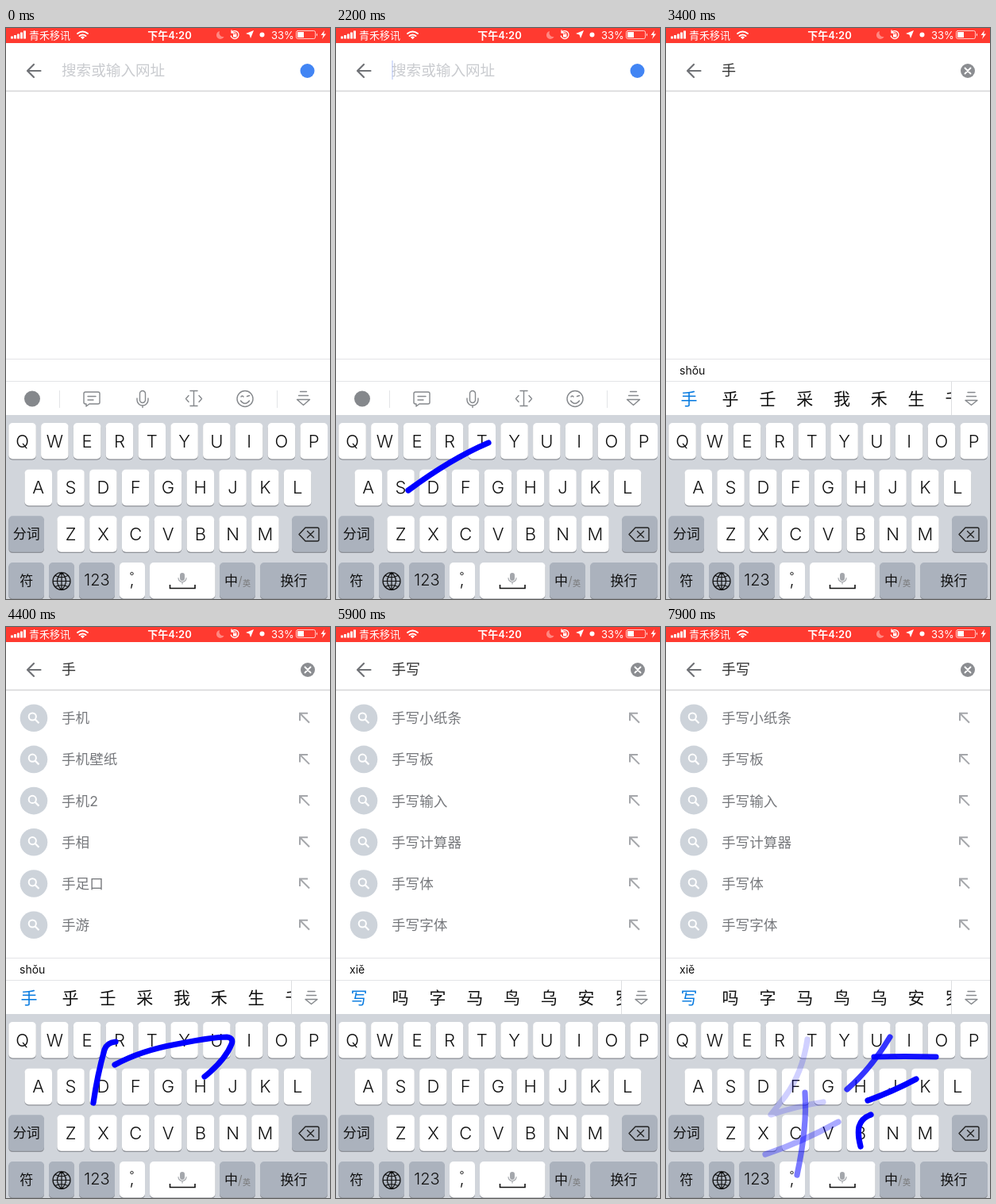
Animation of 408 by 720 pixels, one loop 8000 ms. Source, as an HTML page:

```html
<!DOCTYPE html>
<html lang="zh-CN">
<head>
<meta charset="utf-8">
<title>手写键盘</title>
<style>
  html, body { margin: 0; width: 100%; height: 100%; overflow: hidden; background: #fff; }
  svg { display: block; width: 408px; height: 720px; }
  text { font-family: Inter, "Noto Sans CJK SC", "Noto Sans CJK", sans-serif; }
  .mid { text-anchor: middle; }
  .line { fill: none; stroke-linecap: round; stroke-linejoin: round; }
  #status { fill: #fff; font-size: 13px; }
  #status .line { stroke: #fff; }
  #tools .line, .fold { stroke: #85888c; stroke-width: 1.4; }
  #keys text { font-weight: 300; font-size: 22px; fill: #111; }
  #keys .small { font-size: 17px; font-weight: 350; }
  #ink path { stroke: #00f; stroke-width: 7.2; }
</style>
</head>
<body>
<svg viewBox="0 0 408 720">
  <rect width="408" height="720" fill="#fff"/>

  <g id="status">
    <rect width="408" height="19" fill="#ff3a30"/>
    <path d="M6 10.5h3v3h-3zM10 9h3v4.500h-3zM14 7.500h3v6h-3zM18 5.500h3v8h-3zM22 3.500h3v10h-3z"/>
    <text x="29" y="13.500">青禾移讯</text>
    <path class="line" stroke-width="2" d="M90 7q6.500-5 13 0M92.500 10q4-3 8 0"/>
    <path d="M93.800 11.500q2.700-2 5.400 0l-2.700 2.800z"/>
    <text class="mid" x="206" y="13.500" font-weight="600">下午4:20</text>
    <path opacity=".4" d="M269 4a5 5 0 1 0 5.500 7a5 5 0 0 1-5.500-7z"/>
    <path class="line" stroke-width="1.300" d="M284 5.500a5 5 0 1 1-.8 4.500M284 3v3h3"/>
    <path d="M286 8h4.500v3.500h-4.500z"/>
    <path class="line" stroke-width="1" d="M287 8v-1a1.300 1.300 0 0 1 2.600 0v1"/>
    <path d="M312 3l-4 10-1.500-4.500-4.500-1.500z"/>
    <circle cx="322.500" cy="8.500" r="3"/>
    <text x="334" y="13.500">33%</text>
    <rect class="line" x="365.500" y="3.500" width="24" height="10" rx="2" stroke-width="1" opacity=".75"/>
    <path d="M367 5h8v7h-8zM391 6.500q2 2 0 4z"/>
    <path d="M401 3l-4.500 6h3l-1.500 5 5-6.500h-3z"/>
  </g>

  <path class="line" stroke="#707276" stroke-width="2.200" d="M43.500 54H27.500M35 46l-8 8 8 8"/>
  <path d="M0 79.500H408" stroke="#d5d5d7" stroke-width="1.500"/>
  <text id="hint" x="70" y="59.500" font-size="18.600" fill="#c9cbcf">搜索或输入网址</text>
  <circle id="voice" cx="379.500" cy="54" r="9" fill="#4285f4"/>
  <text id="query" x="70" y="59.500" font-size="18" fill="#333"></text>
  <g id="clear">
    <circle cx="380" cy="54" r="9" fill="#8b8d91"/>
    <path class="line" stroke="#fff" stroke-width="1.900" d="M376.500 50.500l7 7m0-7l-7 7"/>
  </g>
  <rect id="caret" y="41" width="2" height="24" fill="#3a62e0"/>

  <g id="list"></g>

  <path d="M0 417.500H408M0 445.500H408" stroke="#e3e4e7"/>
  <g id="tools">
    <circle cx="33" cy="467.500" r="10" fill="#85888c"/>
    <path d="M67.500 457v22M341.500 457v22" stroke="#e3e4e7"/>
    <path class="line" d="M100 459h16a2 2 0 0 1 2 2v11a2 2 0 0 1-2 2h-11l-4 3v-3h-1a2 2 0 0 1-2-2v-11a2 2 0 0 1 2-2zM103 464.500h10M103 469h7"/>
    <path class="line" d="M168.500 461a3.500 3.500 0 0 1 7 0v8a3.500 3.500 0 0 1-7 0zM165 467v2a7 7 0 0 0 14 0v-2M172 476v2.500"/>
    <path class="line" d="M232 457.500h9M236.500 457.500v19M232 476.500h9M230 463.500l-3.500 4 3.500 4M243 463.500l3.500 4-3.500 4"/>
    <path class="line" d="M291 467.500a10 10 0 1 1 20 0a10 10 0 1 1-20 0M295.500 470q5.500 7 11 0M296 465q1.500-2 3 0M303.500 464.500l3-1"/>
    <path class="line" d="M370.500 458.500h8M368.500 463.500h12M366.500 468.500h16l-8 7z"/>
  </g>
  <g id="bar">
    <text id="pinyin" x="17" y="436.500" font-size="14" fill="#111"></text>
    <g id="words" font-size="21"></g>
    <path d="M360 446h48v42h-48z" fill="#fff"/>
    <path d="M359.500 446v42" stroke="#dddee1"/>
    <path class="line fold" d="M380 459.500h9M378.500 464.500h12M377 469.500h15l-7.500 6z"/>
  </g>

  <rect y="488" width="408" height="232" fill="#d1d5db"/>
  <g id="keys"></g>
  <g id="ink"></g>
</svg>

<script>
const $ = id => document.getElementById(id);
const show = (el, on) => el.style.display = on ? '' : 'none';

// Keyboard
const key = (x, y, w, label = '', gray = false) => `
  <rect x="${x}" y="${y + 1.3}" width="${w}" height="45.500" rx="5" fill="#8d9096"/>
  <rect x="${x}" y="${y}" width="${w}" height="45.500" rx="5" fill="${gray ? '#abb2bd' : '#fff'}"/>
  <text class="mid ${gray ? 'small' : ''}" x="${x + w / 2}" y="${y + (gray ? 29 : 30.5)}">${label}</text>`;

const row = (letters, x, y) => [...letters].map((c, i) => key(x + i * 40.8, y, 34.5, c)).join('');

$('keys').innerHTML =
  row('QWERTYUIOP', 3.3, 498) + row('ASDFGHJKL', 23.5, 556.7) + row('ZXCVBNM', 64.4, 615.3) +
  key(3.3, 615.3, 44.7, '分词', true) + key(360, 615.3, 44.5, '', true) +
  key(3.3, 674, 44.7, '符', true) + key(54, 674, 32, '', true) +
  key(92, 674, 45, '<tspan font-size="20">123</tspan>', true) + key(143, 674, 32) +
  key(181, 674, 82.5) + key(269, 674, 45, '', true) + key(320, 674, 85, '换行', true) + `
  <path class="line" stroke="#222" stroke-width="1.400" d="M377 630h15a2 2 0 0 1 2 2v13a2 2 0 0 1-2 2h-15l-8-8.500zM379.500 634.500l8 8m0-8l-8 8"/>
  <path class="line" stroke="#111" stroke-width="1.200" d="M59 697.500a11 11 0 1 1 22 0a11 11 0 1 1-22 0h22M70 686.500v22M70 686.500q-11 11 0 22q11-11 0-22M62 690.500q8 4 16 0M62 704.500q8-4 16 0"/>
  <circle cx="158.500" cy="688" r="1.700" fill="none" stroke="#222"/>
  <text class="mid" x="158.500" y="703">,</text>
  <rect x="219" y="687" width="6" height="10" rx="3" fill="#a4a7ac"/>
  <path class="line" stroke="#a4a7ac" stroke-width="1.200" d="M217 693.500a5 5 0 0 0 10 0M222 698.500v2.500"/>
  <path fill="none" stroke="#111" stroke-width="1.600" d="M206.500 702v4.500h31.500v-4.500"/>
  <text class="small" x="275" y="703">中</text>
  <text x="292" y="703" style="font-size:16px;fill:#777">/</text>
  <text x="298" y="704" style="font-size:10px;fill:#777">英</text>`;

// Suggestions and candidates
const results = {
  '手': ['手机', '手机壁纸', '手机2', '手相', '手足口', '手游'],
  '手写': ['手写小纸条', '手写板', '手写输入', '手写计算器', '手写体', '手写字体'],
};
const candidates = { 'shǒu': '手乎壬采我禾生千', 'xiě': '写吗字马鸟乌安罗' };

const listRows = words => words.map((word, i) => `
  <g transform="translate(0 ${114.7 + i * 52.2})">
    <circle cx="35" r="17.300" fill="#cdd3da"/>
    <circle cx="33.300" cy="-1.700" r="4.600" fill="none" stroke="#fff" stroke-width="2"/>
    <path d="M36.500 1.500l5 5" stroke="#fff" stroke-width="2.200"/>
    <text x="70" y="6.500" font-size="17.600" fill="#76787c">${word}</text>
    <path d="M370 3.500v-9.500h10M370 -6l12 12" fill="none" stroke="#a5a7ab" stroke-width="2"/>
  </g>`).join('');

const wordRow = chars => [...chars].map((c, i) =>
  `<text class="mid" x="${i ? 34.3 + i * 46.8 : 29}" y="474.500" fill="${i ? '#111' : '#087be0'}">${c}</text>`).join('');

function setContent(el, value, html) {
  if (el.dataset.value === value) return;
  el.dataset.value = value;
  el.innerHTML = html;
}

// Pen strokes: start, end, time wiped, path
const strokes = [
  [2110, 2200, 3400, 'M192 523Q145 543 91 583'],
  [2340, 2440, 3400, 'M110 626Q112 621 120 619Q160 604 193 586'],
  [2530, 2650, 3400, 'M103 651Q155 634 208 606'],
  [2760, 3000, 3400, 'M151 556Q159 585 157 615Q156 660 148 672Q139 681 115 679Q98 678 90 672'],
  [4000, 4150, 5600, 'M138 523Q127 524 124 533Q115 565 110 600'],
  [4220, 4400, 5600, 'M137 552Q170 534 215 526Q260 517 278 517Q287 518 284 526Q276 546 250 567'],
  [4580, 5000, 5600, 'M182 558Q176 590 164 614Q200 604 233 605Q237 640 222 678Q212 692 195 684'],
  [5080, 5230, 5600, 'M118 662Q165 650 214 645'],
  [6010, 6200, 9000, 'M119 557Q145 543 205 541'],
  [6290, 6460, 9000, 'M178 520Q172 562 150 592L132 615Q165 604 198 599'],
  [6560, 6670, 9000, 'M125 665Q170 650 217 624'],
  [6760, 6930, 9000, 'M175 587Q178 630 165 691'],
  [7100, 7310, 9000, 'M282 517Q258 557 228 583'],
  [7390, 7500, 9000, 'M262 542Q300 541 340 542'],
  [7580, 7690, 9000, 'M254 597Q285 586 315 570'],
  [7780, 7900, 9000, 'M258 615Q246 619 243 630Q241 640 245 655'],
];
$('ink').innerHTML = strokes.map(s => `<path class="line" pathLength="1" d="${s[3]}"/>`).join('');
const clamp = v => Math.max(0, Math.min(1, v));

function drawInk(t) {
  strokes.forEach(([start, end, wiped], i) => {
    const el = $('ink').children[i];
    const alpha = clamp(1 - (t - end - 300) / 1400);
    show(el, t >= start && t < wiped && alpha > 0);
    el.style.strokeDasharray = `${clamp((t - start) / (end - start))} 3`;
    el.style.opacity = alpha;
  });
}

function caretAlpha(t) {
  const origin = t < 3400 ? 0 : t < 5600 ? 3370 : 5870;
  const phase = (t - origin + 1050) % 1050;
  return Math.min(clamp((phase - 50) / 250), clamp((980 - phase) / 80));
}

function draw(now) {
  const t = Math.floor(now % 8000 / 100) * 100;
  const typed = t < 3400 ? '' : t < 5600 ? '手' : '手写';
  const found = t < 3700 ? '' : t < 5800 ? '手' : '手写';
  const pinyin = typed.length > 1 ? 'xiě' : 'shǒu';

  $('query').textContent = typed;
  for (const id of ['hint', 'voice', 'tools']) show($(id), !typed);
  for (const id of ['clear', 'bar']) show($(id), typed);
  $('pinyin').textContent = pinyin;
  setContent($('words'), pinyin, wordRow(candidates[pinyin]));
  setContent($('list'), found, listRows(results[found] || []));
  $('caret').setAttribute('x', 70 + typed.length * 18);
  $('caret').style.opacity = caretAlpha(t);
  drawInk(t);
  requestAnimationFrame(draw);
}
requestAnimationFrame(draw);
</script>
</body>
</html>
```
